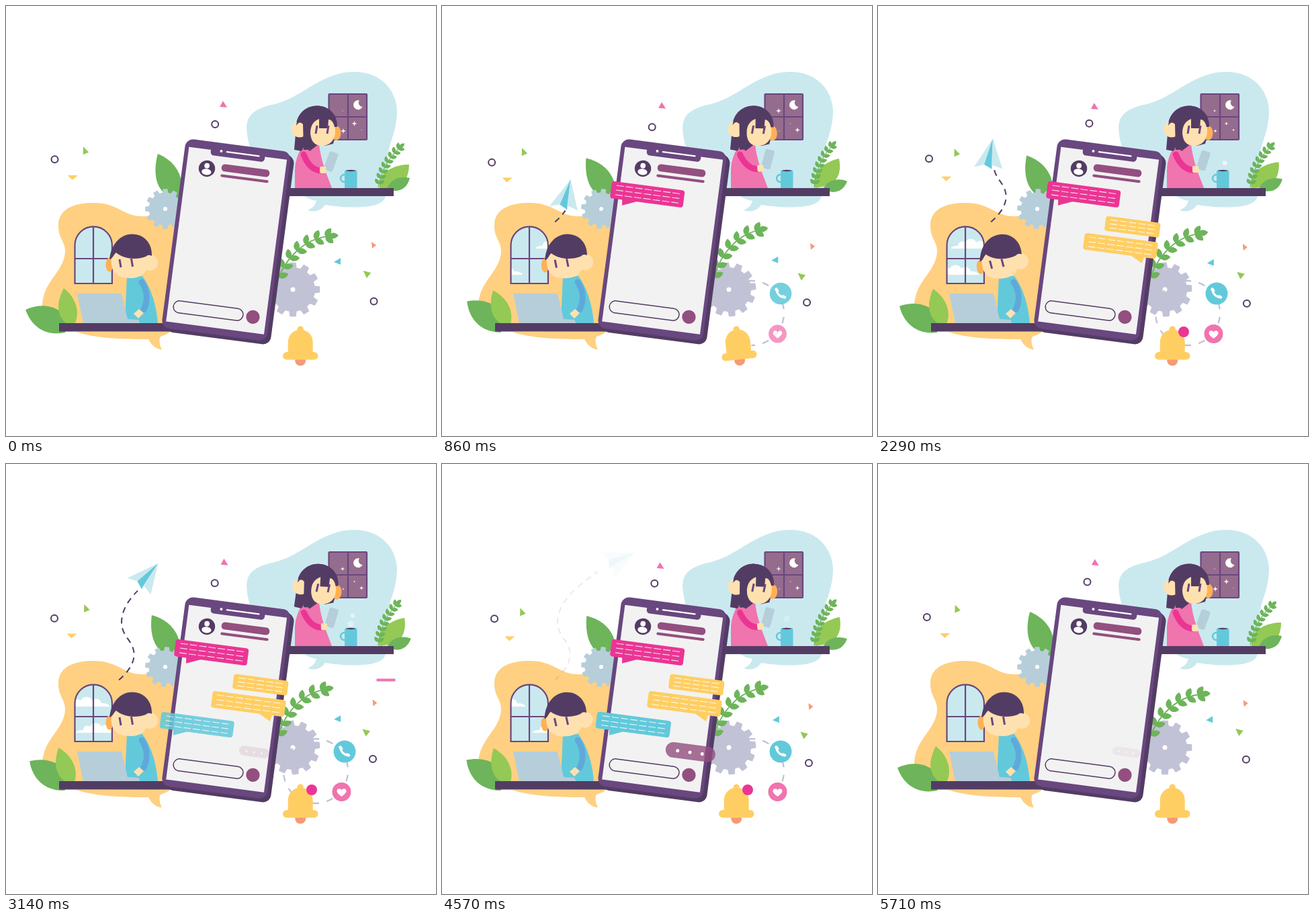
Recreate the animation shown at these times as an HTML page. Size 640 px wide and 640 px high, loop 5.78 s.

```html
<!DOCTYPE html>
<html lang="en">
<head>
<meta charset="utf-8">
<title>Chat illustration</title>
<style>
  html, body { margin: 0; width: 100%; height: 100%; overflow: hidden; background: #fff; }
  svg { display: block; width: 100vw; height: 100vh; }
  .dark { fill: #533c64; } .plum { fill: #69477f; } .skin { fill: #ffe1b0; } .amber { fill: #ffb155; }
  .teal { fill: #62c9db; } .pale { fill: #cae9ef; } .steel { fill: #b6ced9; } .pink { fill: #f074ae; }
  .hot { fill: #eb3594; } .yellow { fill: #ffce63; } .wine { fill: #934f80; } .coral { fill: #f69a76; }
  .leaf { fill: #6db45a; } .lime { fill: #93c954; } .white { fill: #fff; } .lilac { fill: #c1c2d5; }
  .line { fill: none; stroke: #69477f; stroke-width: 2.2; }
  .ink { fill: none; stroke: #533c64; stroke-width: 2; }
  .text { fill: none; stroke: #fff; stroke-width: 1.1; stroke-dasharray: 11 3; opacity: .85; }
  .eye { fill: none; stroke: #69477f; stroke-width: 3; }
  .round { stroke-linecap: round; }
</style>
</head>
<body>
<svg viewBox="0 0 640 640">
  <defs>
    <clipPath id="pane"><path d="M102.500 413V356a27.700 27.700 0 0 1 55.400 0V413Z"/></clipPath>
    <path id="cloud" d="M0 0C2-4 8-4 11-4C11-10 17-12 21-9C24-16 36-16 38-9C43-14 51-11 52-5C57-5 63-4 65 0Z"/>
    <path id="star" d="M0-4L.9-.9L4 0L.9.9L0 4L-.9.9L-4 0L-.9-.9Z"/>
    <path id="trail" d="M168 321.500C178 313 192 298 190.500 281C189 263 172 256 172 236C172 206 200 182 232 160"/>
    <mask id="trailMask" maskUnits="userSpaceOnUse" x="0" y="0" width="640" height="640">
      <use id="trailReveal" href="#trail" fill="none" stroke="#fff" stroke-width="8"/>
    </mask>
    <mask id="wheelMask" maskUnits="userSpaceOnUse" x="0" y="0" width="640" height="640">
      <circle id="wheelReveal" cx="461" cy="457" r="48" pathLength="360" fill="none" stroke="#fff"
        stroke-width="8" transform="rotate(-135 461 457)"/>
    </mask>
  </defs>

  <!-- backdrops -->
  <path fill="#ffd081" d="M250 484H100C60 479 49 456 56 432C63 405 87 392 88 365C88 350 77 345 78 325C79 300 105 293 130 293C168 293 175 314 205 313C225 312 240 310 262 322V484ZM104 485C130 494 170 496 212 496C216 504 222 510 232 511.500C229 505 227 498 230 492C236 490 242 487 246 484Z"/>
  <path class="pale" d="M425 275C395 262 372 235 363 210C352 170 358 155 400 146C440 137 470 98 518 98C560 98 583 128 582 160C580 195 567 205 568 235C569 250 577 258 576 273ZM444 283C448 286 456 289 462 290C460 298 454 302 449 304C460 308 470 304 475 296C500 300 545 303 560 291C563 288 564 286 565 283Z"/>

  <!-- arched window -->
  <g clip-path="url(#pane)">
    <path class="pale" d="M100 325h60v90h-60z"/>
    <use id="cloudA" class="white" href="#cloud"/>
    <use id="cloudB" class="white" href="#cloud"/>
  </g>
  <path class="line" d="M102.500 413V356a27.700 27.700 0 0 1 55.400 0V413ZM130 328V413M102 376H158"/>

  <!-- left plants and worker -->
  <path class="leaf" data-sway="13 88 482" d="M88 486C60 492 38 478 29 452C55 440 85 447 92 472Z"/>
  <path class="lime" data-sway="-11 98 474" d="M86 420C76 440 72 462 95 476L102 474C111 456 104 434 86 420Z"/>
  <path class="teal" d="M180 402H203C216 420 224 445 226 473H198L177 466Z"/>
  <path class="steel" d="M106 428H172L181 466L197 467L200 473H115Z"/>
  <path class="round" fill="none" stroke="#5fa9da" stroke-width="9" d="M202 411C211 424 211 439 205 452"/>
  <path class="skin" d="M190 458L198 451L205 457L197 465Z"/>
  <g id="man">
    <ellipse class="amber" cx="154" cy="385" rx="5.500" ry="10.500"/>
    <path class="skin" d="M158 368C154 388 158 405 185 405C202 405 209 397 209 387L213 366Z"/>
    <circle class="skin" cx="214" cy="382" r="12"/>
    <path class="dark" d="M154 377C157 352 172 339.500 188 339.500C206 339.500 218 354 217 372Q212 369 208 373C195 378 175 377 164 367C160 370 159 376 154 377Z"/>
    <path class="eye" d="M169 377L171 389M186.500 376L188.500 388"/>
  </g>
  <path class="dark" d="M79 472H246V484.500H79Z"/>

  <!-- night window, woman and right plants -->
  <rect class="line" x="480.500" y="131" width="56.500" height="68" rx="1" style="fill:#956c8d"/>
  <path class="line" d="M509 131V199M480 165H537"/>
  <path class="white" d="M526 140.500A7 7 0 1 0 530.500 150A6 6 0 0 1 526 140.500Z"/>
  <use class="white" href="#star" data-star="501 156 1"/>
  <use class="white" href="#star" data-star="529 184.500 1"/>
  <use class="white" href="#star" data-star="518.500 175 0"/>
  <use class="white" href="#star" data-star="502 186 0"/>
  <path class="pink" d="M443 206H466C469 232 478 252 485 271H430V245C430 230 436 216 443 206Z"/>
  <g data-sway="-5 444 216">
    <rect class="steel" x="477" y="217" width="14" height="29" rx="3" transform="rotate(20 484 231)"/>
    <path class="round" fill="none" stroke="#eb3594" stroke-width="9" d="M443 221C449 237 457 244 468 245"/>
    <rect class="skin" x="467" y="239" width="9.500" height="10" rx="2"/>
  </g>
  <g id="woman">
    <path class="dark" d="M431 190C429 162 445 148.500 463 148.500C485 148.500 497 170 491 190L487 205L475 208L466 205L452 216L444 208L440 216L429 214Z"/>
    <ellipse class="amber" cx="491.500" cy="189" rx="7" ry="11"/>
    <path class="skin" d="M453 182C453 168 462 164 471 164C482 164 490 172 490 186C490 200 482 208 470 208C458 208 452 199 453 182Z"/>
    <circle class="skin" cx="437" cy="183.500" r="12"/>
    <path class="dark" d="M432 178C434 160 447 148.500 463 148.500C482 148.500 494 163 493 180L489 180C487 171 483 169 480 169L479 182H466V168C456 172 453 180 453 190L452 214H443L442 176Q437 170 432 178Z"/>
    <path class="eye" d="M463 178L461 190M480 178L478 190"/>
  </g>
  <circle class="white" id="puffA" cx="516" r="3.200"/>
  <circle class="white" id="puffB" cx="513" r="4.500"/>
  <circle cx="503.500" cy="256.500" r="5.500" fill="none" stroke="#62c9db" stroke-width="2.500"/>
  <rect class="teal" x="504" y="244" width="18.500" height="28" rx="3"/>
  <ellipse class="dark" cx="513.200" cy="245" rx="7" ry="1.200"/>
  <path class="lime" data-sway="-13 556 272" d="M600 236C574 236 553 250 556 271H575C595 268 600 250 600 236Z"/>
  <path class="leaf" data-sway="8 568 274" d="M601 256C585 252 570 260 567 273C585 279 597 272 601 256Z"/>
  <g data-sway="-5.500 555 270" data-vine="9 8 9.500" data-path="M554 270C558 248 567 228 586 211"/>
  <path class="dark" d="M415 271H577V283H415Z"/>

  <!-- gears, wheel of icons -->
  <path class="leaf" data-sway="-10 258 290" d="M226 220C218 250 222 280 256 290C270 262 256 232 226 220Z"/>
  <path class="steel" data-sway="7 237 302" data-gear="237 302 30 24.500 3"/>
  <g mask="url(#wheelMask)">
    <circle cx="461" cy="457" r="48" pathLength="360" fill="none" stroke="#c1c2d5" stroke-width="2.300"
      stroke-dasharray="12 13.714" transform="rotate(-96 461 457)"/>
  </g>
  <path class="lilac" data-sway="-7 427 422" data-gear="427 422 40.500 33 3.500"/>
  <g data-sway="-7.500 405 410" data-vine="8 7 15" data-path="M403 412C415 375 445 346 480 343"/>

  <g data-pop="600 504 428 4950">
    <circle class="teal" cx="504" cy="428" r="16.500"/>
    <path class="round" fill="none" stroke="#fff" stroke-width="3.200" d="M498 422C498 428 503 433 509.500 433.500"/>
    <path class="round" fill="none" stroke="#fff" stroke-width="4.500" d="M497.500 421.500L499 424M507.500 432.500L510 433.500"/>
  </g>
  <g data-pop="640 499.500 488 4720">
    <circle class="pink" cx="499.500" cy="488" r="14"/>
    <path class="white" d="M499.500 495C494 491 492.500 488.500 492.500 486.500C492.500 482.500 498 482 499.500 485.500C501 482 506.500 482.500 506.500 486.500C506.500 488.500 505 491 499.500 495Z"/>
  </g>
  <g id="bell">
    <circle class="coral" cx="438.200" cy="527.500" r="8"/>
    <circle class="yellow" cx="438.200" cy="481" r="4.600"/>
    <path class="yellow" d="M419.700 518V500a18.500 18.500 0 0 1 37 0V518Z"/>
    <rect class="yellow" x="412" y="515" width="52.500" height="11.500" rx="5.700"/>
  </g>
  <circle class="hot" cx="455" cy="485" r="8" data-pop="1200 455 485 5060"/>

  <!-- paper plane -->
  <g id="flight">
    <use class="ink" href="#trail" mask="url(#trailMask)" style="stroke-dasharray:9 7"/>
    <g id="plane">
      <path class="pale" d="M0-43L-21 3L-6.500-3L5-4L21-1Z"/>
      <path class="teal" d="M0-43L-6.500-3L6 2L4.500-5Z"/>
      <path class="pale" d="M0-43L4.500-5L21-1Z"/>
    </g>
  </g>
  <path id="dashA" fill="none" stroke="#62c9db" stroke-width="4"/>
  <path id="dashB" fill="none" stroke="#f074ae" stroke-width="4"/>

  <!-- confetti: orbit radius, direction, phase -->
  <circle class="ink" cx="75" cy="230" r="5" data-orbit="3 -1 3.740"/>
  <circle class="ink" cx="313.500" cy="177.500" r="5" data-orbit="2.800 -1 3.740"/>
  <circle class="ink" cx="546" cy="442" r="5" data-orbit="3 -1 5.240"/>
  <path class="lime" d="M116.400 211.500L124.600 220L116 223.500Z" data-orbit="2.700 1 -2.100"/>
  <path class="pink" d="M324.400 143.500L330.500 153.400L319.500 152.400Z" data-orbit="2.700 1 -2.100"/>
  <path class="coral" d="M545.400 353.300L552.400 358.300L546.400 363.300Z" data-orbit="2.700 1 -2.100"/>
  <path class="yellow" d="M92 254.500H107L99 261.500Z" data-orbit="2.500 -1 4.640"/>
  <path class="lime" d="M532 396.500L543.500 399.500L537 407.500Z" data-orbit="2.500 -1 4.640"/>
  <path class="teal" d="M490 380.700L500 374.700V384.700Z" data-orbit="2 1 2.970"/>

  <!-- phone -->
  <g transform="translate(268 197) rotate(7.500)">
    <rect class="dark" x="3" y="3" width="158" height="284" rx="12"/>
    <rect class="dark" x="6" y="5" width="158" height="284" rx="12"/>
    <rect class="plum" width="158" height="284" rx="12"/>
    <path fill="#f2f2f2" d="M6 12H153V274H6Z"/>
    <rect class="plum" x="39" y="6" width="81" height="14" rx="5"/>
    <circle class="white" cx="54.500" cy="12" r="2"/>
    <path class="round" stroke="#fff" stroke-width="2.400" d="M63 12H111"/>
    <circle class="dark" cx="36.600" cy="40.500" r="12.200"/>
    <circle class="white" cx="36.200" cy="36.300" r="3.900"/>
    <ellipse class="white" cx="36.600" cy="45.500" rx="7.200" ry="4.600"/>
    <rect class="wine" x="58" y="30.500" width="72" height="11" rx="5"/>
    <rect class="wine" x="58" y="46" width="72" height="4" rx="2"/>
    <rect class="ink" x="14" y="241" width="104.500" height="18" rx="9" style="stroke-width:1.500"/>
    <circle class="wine" cx="133.300" cy="250.600" r="10.200"/>

    <g class="hot" data-pop="400 13 99 5350">
      <rect x="-6.500" y="65" width="109.500" height="25.500" rx="4"/><path d="M12 89L13 99L35 90Z"/>
      <path class="text" d="M1 70.500H97M1 77.500H97M1 84.500H97"/>
    </g>
    <g class="yellow" data-pop="1470 168 116 5300">
      <rect x="86" y="105" width="82" height="22" rx="4"/>
      <path class="text" d="M93 110H162M93 116H162M93 122H162"/>
    </g>
    <g class="yellow" data-pop="1650 148 167 5300">
      <rect x="58" y="134" width="110" height="25" rx="4"/><path d="M129 158H150L148 168Z"/>
      <path class="text" d="M65 139.500H161M65 146.500H161M65 153.500H161"/>
    </g>
    <g class="teal" data-pop="2885 8 207 5350">
      <rect x="-14" y="174.500" width="111" height="25" rx="4"/><path d="M7 198L8 207.500L29 199Z"/>
      <path class="text" d="M-6 180H90M-6 187H90M-6 194H90"/>
    </g>
    <g data-pop="3095 131 216.500 5400">
      <rect class="wine" x="94" y="205" width="74.500" height="23" rx="11.500" opacity=".8"/>
      <g class="white"><circle cx="112" cy="217" r="2.500"/><circle cx="130.400" cy="217" r="2.500"/><circle cx="148.800" cy="217" r="2.500"/></g>
    </g>
  </g>
</svg>

<script>
const LOOP = 5780, TAU = Math.PI * 2;
const byId = id => document.getElementById(id);
const clamp = x => Math.max(0, Math.min(1, x));
const ramp = (t, from, to) => clamp((t - from) / (to - from));
const setTransform = (el, value) => el.setAttribute('transform', value);

// All elements carrying data-<name>, with its numbers.
const collect = name => [...document.querySelectorAll(`[data-${name}]`)]
  .map(el => ({ el, v: el.dataset[name].split(' ').map(Number) }));

// Interpolate rows of [time, ...values].
function track(t, rows) {
  let i = 0;
  while (i < rows.length - 2 && t > rows[i + 1][0]) i++;
  const a = rows[i], b = rows[i + 1], p = ramp(t, a[0], b[0]);
  return a.slice(1).map((x, k) => x + (b[k + 1] - x) * p);
}

function svgPath(parent, attrs) {
  const el = document.createElementNS('http://www.w3.org/2000/svg', 'path');
  for (const key in attrs) el.setAttribute(key, attrs[key]);
  return parent.appendChild(el);
}

for (const { el, v: [cx, cy, outer, inner, hole] } of collect('gear')) {
  const points = [];
  for (let i = 0; i < 12; i++) {
    for (const [offset, r] of [[-.17, inner], [-.115, outer], [.115, outer], [.17, inner]]) {
      const a = i * TAU / 12 + offset;
      points.push(`${cx + r * Math.cos(a)} ${cy + r * Math.sin(a)}`);
    }
  }
  el.setAttribute('fill-rule', 'evenodd');
  el.setAttribute('d', `M${points.join('L')}Z M${cx - hole} ${cy}a${hole} ${hole} 0 1 0 ${2 * hole} 0a${hole} ${hole} 0 1 0 ${-2 * hole} 0Z`);
}

for (const { el, v: [, pairs, size] } of collect('vine')) {
  const stem = svgPath(el, { d: el.dataset.path, fill: 'none', stroke: '#6db45a', 'stroke-width': size / 8 });
  const length = stem.getTotalLength();
  const addLeaf = (at, turn) => {
    const p = stem.getPointAtLength(at), q = stem.getPointAtLength(at - 1);
    const angle = Math.atan2(p.y - q.y, p.x - q.x) * 360 / TAU + turn;
    svgPath(el, {
      class: 'leaf', d: 'M0 0C.2-.42.7-.42 1 0C.7.36.2.36 0 0Z',
      transform: `translate(${p.x} ${p.y}) rotate(${angle}) scale(${size})`
    });
  };
  for (let i = 0; i < pairs; i++) {
    const at = length * (.08 + .88 * i / (pairs - 1));
    addLeaf(at, -48);
    addLeaf(at, 48);
  }
  addLeaf(length, 0);
}

const sways = collect('sway'), pops = collect('pop'), orbits = collect('orbit'), stars = collect('star');
const trailLength = byId('trail').getTotalLength();

const manNod = [[0, 0], [860, -2], [1710, 0], [2290, -5.500], [3140, 0], [4570, -3.500], [5710, 0]];
const womanNod = [[0, 0], [860, 1], [1710, 2.500], [2290, 0], [3140, 3], [4570, 2], [5710, 0]];
// time, x, y, heading, trail length
const flightPlan = [
  [400, 174, 316, 25, 0], [860, 181, 300, 14, 23], [1710, 173.500, 267, -2, 66], [2290, 164, 240, 9, 95],
  [3140, 198.500, 181, 40, 152], [3750, 248, 149.500, 66, 200]
];

function streak(el, t, start, x, y, width) {
  const head = ramp(t, start, start + 180), tail = ramp(t, start + 220, start + 400);
  el.setAttribute('d', head > tail ? `M${x + width * tail} ${y}H${x + width * head}` : '');
}

function puff(el, t, start, end, y0, y1, strength) {
  const p = ramp(t, start, end);
  el.setAttribute('cy', y0 + (y1 - y0) * p);
  el.setAttribute('opacity', strength * Math.min(1, p * 6) * Math.min(1, (1 - p) * 1.600));
}

function draw(t) {
  const sway = (1 - Math.cos(TAU * (3 * t / LOOP + .03))) / 2;
  const turn = 2 * TAU * t / LOOP;

  for (const { el, v: [angle, x, y] } of sways) setTransform(el, `rotate(${angle * sway} ${x} ${y})`);
  for (const { el, v: [r, dir, phase] } of orbits) {
    const a = dir * turn + phase;
    setTransform(el, `translate(${r * Math.cos(a)} ${r * Math.sin(a)})`);
  }
  for (const { el, v: [x, y, rising] } of stars) {
    setTransform(el, `translate(${x} ${y}) scale(${.25 + .75 * (rising ? sway : 1 - sway)})`);
  }
  for (const { el, v: [start, x, y, end] } of pops) {
    const p = Math.min(ramp(t, start, start + 300), 1 - ramp(t, end, end + 340));
    const scale = .5 + .5 * Math.sin(p * TAU / 4);
    el.setAttribute('opacity', p);
    setTransform(el, `translate(${x} ${y}) scale(${scale}) translate(${-x} ${-y})`);
  }

  setTransform(byId('man'), `rotate(${track(t, manNod)} 190 404)`);
  setTransform(byId('woman'), `rotate(${track(t, womanNod)} 460 210)`);
  setTransform(byId('cloudA'), `translate(${157 - .0213 * t} 361)`);
  setTransform(byId('cloudB'), `translate(${37 + .0213 * t} 400)`);
  puff(byId('puffA'), t, 1600, 4200, 240, 216, .75);
  puff(byId('puffB'), t, 2800, 5300, 240, 226, .5);

  const ring = ramp(t, 700, 1800);
  setTransform(byId('bell'), `rotate(${-7 * (1 - ring) * Math.sin(ring * 1100 / 580 * TAU)} 438 480)`);
  const wheel = 360 * Math.min(ramp(t, 560, 1040), 1 - ramp(t, 4390, 4720));
  byId('wheelReveal').setAttribute('stroke-dasharray', `${wheel} 400`);

  const [x, y, heading, trail] = track(t, flightPlan);
  setTransform(byId('plane'), `translate(${x} ${y}) rotate(${heading})`);
  byId('trailReveal').setAttribute('stroke-dasharray', `${Math.min(trail, trailLength)} 400`);
  byId('flight').setAttribute('opacity', Math.min(ramp(t, 450, 700), 1 - ramp(t, 4250, 4610)));

  streak(byId('dashA'), t, 1520, 149, 172, 26);
  streak(byId('dashB'), t, 2950, 551.500, 321.500, 28);
}

const begin = performance.now();
function frame() {
  draw((performance.now() - begin) % LOOP);
  requestAnimationFrame(frame);
}
frame();
</script>
</body>
</html>
```
